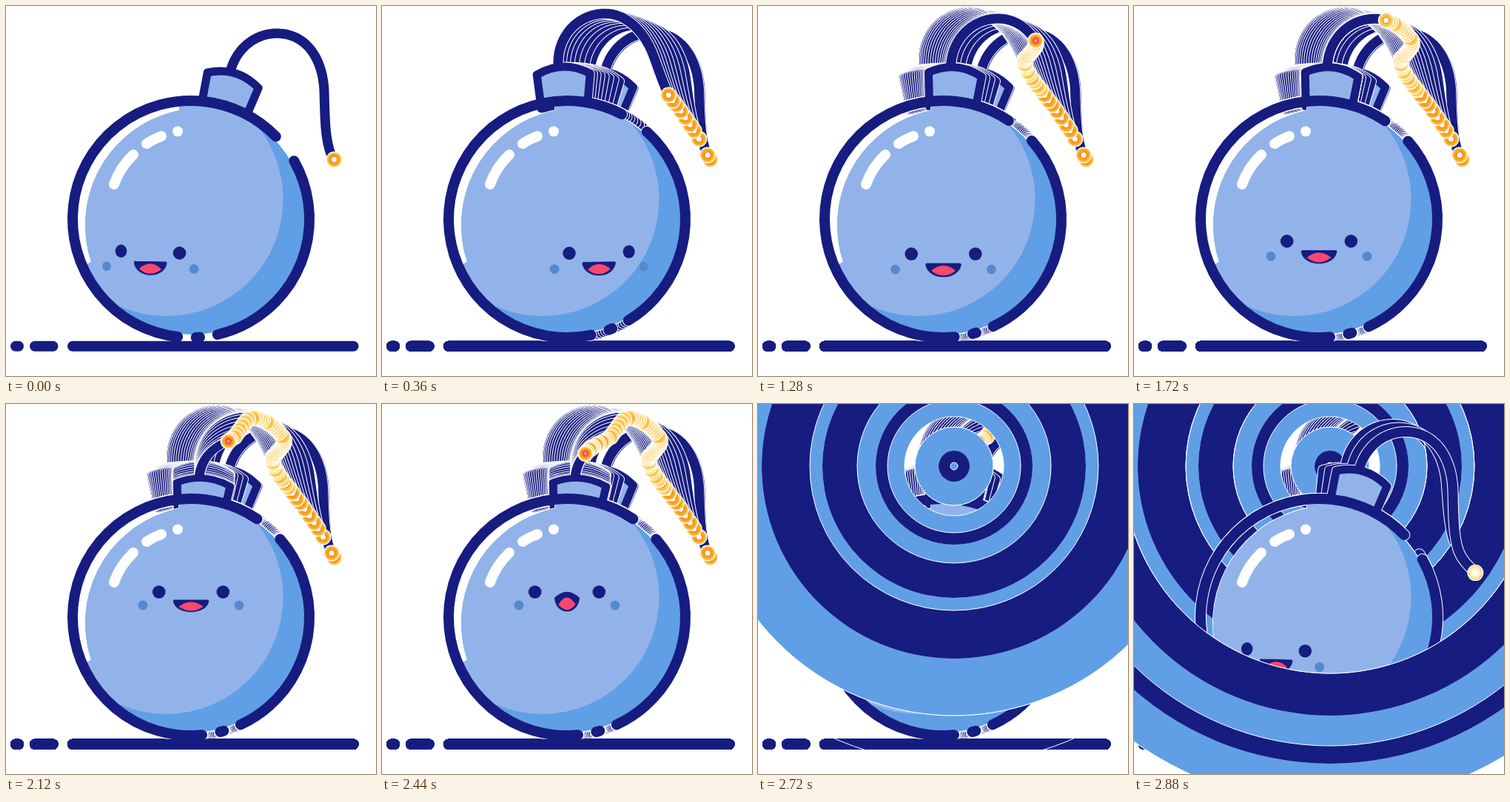
Write an HTML page with a canvas that moves like this. It is 500 px wide and 500 px high and loops after 3.08 s.

```html
<!DOCTYPE html>
<html lang="en">
<head>
<meta charset="utf-8">
<title>Bomb</title>
<style>
html, body { margin: 0; width: 100%; height: 100%; overflow: hidden; background: #fff; }
canvas { display: block; width: 500px; height: 500px; }
</style>
</head>
<body>
<canvas id="stage" width="500" height="500"></canvas>
<script>
const ctx = document.getElementById('stage').getContext('2d');
const NAVY = '#171c80', BLUE = '#609fe6', LIGHT = '#92b3ea', CHEEK = '#5489cf', PINK = '#f7486f';
const LOOP = 3080, STEP = 40, LAST = 72;
const CX = 250, CY = 288, BX = 265, BY = 84;
const TAU = Math.PI * 2;

const rad = a => a * Math.PI / 180;
const lerp = (a, b, u) => a + (b - a) * u;
const clamp = u => Math.max(0, Math.min(1, u));
const span = (t, a, b) => clamp((t - a) / (b - a));
const smooth = u => u * u * (3 - 2 * u);
const easeOut = (u, p) => 1 - Math.pow(1 - u, p);

// Fuse as a polyline with running length
const fuse = [];
let fuseLen = 0;
[
  [302, 94, 308, 60, 335, 37, 366, 37],
  [366, 37, 405, 37, 428, 70, 430, 115],
  [430, 115, 431, 150, 431, 176, 438, 197],
  [438, 197, 443, 210, 452, 218, 461, 227]
].forEach(b => {
  for (let i = 0; i <= 30; i++) {
    const u = i / 30, v = 1 - u;
    const at = o => v * v * v * b[o] + 3 * v * v * u * b[o + 2] + 3 * v * u * u * b[o + 4] + u * u * u * b[o + 6];
    const x = at(0), y = at(1), p = fuse[fuse.length - 1];
    if (p) fuseLen += Math.hypot(x - p.x, y - p.y);
    fuse.push({ x, y, len: fuseLen });
  }
});

function tilt(t) {
  if (t >= 2760) return t < 2820 ? -5 : t < 2860 ? -2.5 : 0.3;
  if (t < 80) return -0.5 * t / 40;
  if (t < 640) return lerp(-6.2, -22.2, easeOut(span(t, 80, 640), 2));
  return lerp(-22.2, -11.8, smooth(span(t, 640, 1340)));
}

function faceShift(t) {
  if (t >= 2760) return -58;
  if (t < 640) return lerp(-55, 52, easeOut(span(t, 40, 640), 3.3));
  return lerp(52, 0, smooth(span(t, 640, 1320)));
}

function pose(t) {
  const back = t >= 2760;
  return {
    t,
    turn: rad(tilt(t)),
    shift: faceShift(t),
    rise: back ? 0 : smooth(span(t, 1560, 2100)),
    press: back ? 0 : smooth(span(t, 1760, 2120)),
    open: back ? 0 : smooth(span(t, 2240, 2440)),
    left: back ? fuseLen : Math.max(4, fuseLen - 26 - 0.103 * t)
  };
}

function disc(x, y, r, col) {
  ctx.fillStyle = col;
  ctx.beginPath();
  ctx.arc(x, y, r, 0, TAU);
  ctx.fill();
}

function oval(x, y, rx, ry, col) {
  ctx.fillStyle = col;
  ctx.beginPath();
  ctx.ellipse(x, y, rx, ry, 0, 0, TAU);
  ctx.fill();
}

function stroke(col, w) {
  ctx.strokeStyle = col;
  ctx.lineWidth = w;
  ctx.stroke();
}

function turnBody(p, press) {
  if (press) {
    ctx.translate(0, 185);
    ctx.scale(1, 1 - 0.172 * p.press);
    ctx.translate(0, -185);
  }
  ctx.translate(CX, CY);
  ctx.rotate(p.turn);
}

function drawFuse(p, col, grow) {
  ctx.save();
  turnBody(p, true);
  ctx.translate(-CX, -CY);
  ctx.beginPath();
  for (const q of fuse) {
    if (q.len > p.left) break;
    ctx.lineTo(q.x, q.y);
  }
  stroke(col, 13 + grow);
  ctx.restore();
}

function drawCap(p, col, grow) {
  ctx.save();
  turnBody(p, true);
  ctx.rotate(rad(16.8));
  ctx.beginPath();
  ctx.moveTo(-31, -150);
  ctx.lineTo(-36, -196);
  ctx.quadraticCurveTo(0, -216, 36, -196);
  ctx.lineTo(31, -150);
  ctx.closePath();
  ctx.fillStyle = LIGHT;
  ctx.fill();
  stroke(col, 11 + grow);
  ctx.restore();
}

function drawOutline(p, col, grow) {
  ctx.save();
  turnBody(p, false);
  for (const [a, b] of [[-29.5, 77.1], [85.7, 87.6], [96.4, 315.8]]) {
    ctx.beginPath();
    ctx.arc(0, 0, 160, rad(a), rad(b));
    stroke(col, 14 + grow);
  }
  ctx.restore();
}

function drawBody() {
  ctx.save();
  ctx.beginPath();
  ctx.arc(CX, CY, 156, rad(-95.9), rad(156.3));
  ctx.arc(265, 296, 158, rad(161.7), rad(258.8));
  ctx.closePath();
  stroke('#fff', 2);
  ctx.fillStyle = BLUE;
  ctx.fill();
  ctx.clip();
  disc(216.5, 261, 158, LIGHT);
  ctx.restore();

  ctx.beginPath();
  ctx.moveTo(146, 241);
  ctx.quadraticCurveTo(154, 218, 172, 201);
  ctx.moveTo(190, 186);
  ctx.quadraticCurveTo(199, 180, 210, 176);
  stroke('#fff', 14);
  disc(232, 169.5, 7, '#fff');
}

function drawFace(p) {
  const s = p.shift, side = Math.abs(s) / 55;
  const x = CX + s, y = 335 - 2.5 * side - 81 * p.rise;
  const low = 21 - 3 * p.rise, wide = 1 - 0.08 * side;
  const lean = s * 0.025;
  for (const k of [-1, 1]) {
    const far = k * s > 0 ? side : 0;
    oval(x + k * lerp(43.3, 39.5, side), y - k * lean, 8.8 - far, 8.8, NAVY);
    oval(x + k * lerp(65, 59, side), y + low - k * lean * 1.4, 6.4 - far * 0.5, 6.4, CHEEK);
  }
  const up = p.open * 10;
  ctx.save();
  ctx.translate(x, y + low + 0.8);
  ctx.rotate(-s * 0.0005);
  ctx.scale(wide * (1 - 0.3 * p.open), 1 - 0.1 * p.rise);
  ctx.beginPath();
  ctx.moveTo(-22, -7 - up * 0.4);
  ctx.quadraticCurveTo(0, -7 - up * 2, 22, -7 - up * 0.4);
  ctx.bezierCurveTo(18, 12, -18, 12, -22, -7 - up * 0.4);
  ctx.fillStyle = NAVY;
  ctx.fill();
  stroke(NAVY, 4.5);
  ctx.beginPath();
  ctx.moveTo(-16.5, 1 - up * 0.3);
  ctx.quadraticCurveTo(0, -13 - up, 16.5, 1 - up * 0.3);
  ctx.quadraticCurveTo(0, 14, -16.5, 1 - up * 0.3);
  ctx.fillStyle = PINK;
  ctx.fill();
  ctx.restore();
}

function drawSpark(p) {
  let tip = fuse[0];
  for (const q of fuse) if (q.len <= p.left) tip = q;
  const dx = tip.x - CX, dy = tip.y - CY;
  const c = Math.cos(p.turn), s = Math.sin(p.turn);
  const x = CX + dx * c - dy * s;
  const y = 185 + (CY + dx * s + dy * c - 185) * (1 - 0.172 * p.press);
  const pale = p.t > 2760;
  const early = p.t < 400;
  const red = p.t > 1200 && p.t < 1320 || p.t > 2080 && !pale;
  disc(x, y, 11, '#fff');
  disc(x, y, 9.8, early ? '#fbc04a' : '#fdd679');
  disc(x, y, 7.8, pale ? '#fdecc0' : early || red ? '#f9a01b' : '#fcc23c');
  disc(x, y, 4.8, pale ? '#fff7e2' : red ? '#f0574a' : '#f68b28');
  disc(x, y, red ? 1.8 : 3.4, red ? '#fbb08a' : '#fff');
}

function drawGround() {
  ctx.beginPath();
  for (const [a, b] of [[13, 17], [39, 63.5], [90, 469.5]]) {
    ctx.moveTo(a, 459.8);
    ctx.lineTo(b, 459.8);
  }
  stroke(NAVY, 14);
}

function drawBomb(t) {
  const p = pose(t);
  drawFuse(p, '#fff', 2);
  drawCap(p, '#fff', 2);
  drawOutline(p, '#fff', 2);
  drawFuse(p, NAVY, 0);
  drawCap(p, NAVY, 0);
  drawBody();
  drawOutline(p, NAVY, 0);
  drawFace(p);
  drawGround();
  drawSpark(p);
}

function band(a, b, col) {
  if (b <= a) return;
  ctx.fillStyle = col;
  ctx.beginPath();
  ctx.arc(BX, BY, b, 0, TAU);
  ctx.arc(BX, BY, a, 0, TAU, true);
  ctx.fill();
}

function rim(r) {
  if (r <= 0) return;
  ctx.beginPath();
  ctx.arc(BX, BY, r, 0, TAU);
  stroke('#fff', 1);
}

// Blast: each radius is taken over by the next wave one step later
const FRONT = [21, 53, 106, 178, 260, 337, 402, 457, 620];
const HOLE = [0, 0, 5, 67, 90, 131, 195, 280, 378];

function drawBlast(i) {
  const mid = FRONT[i - 1] || 0, inner = FRONT[i - 2] || 0, hole = HOLE[i];
  band(Math.max(hole, inner), mid, BLUE);
  band(hole, inner, NAVY);
  rim(hole);
  rim(mid);
  rim(FRONT[i]);
}

function drawStep(k) {
  const t = k * STEP;
  if (k < 62) drawBomb(t);
  else if (k <= 70) drawBlast(k - 62);
  if (k >= 70) {
    const r = [131, 195, 280][k - 70];
    ctx.save();
    ctx.beginPath();
    ctx.arc(BX, BY, r, 0, TAU);
    ctx.clip();
    drawBomb(t);
    ctx.restore();
    rim(r);
  }
}

// Steps pile up on the canvas until the loop restarts
let done = -1;
function show(now) {
  const k = Math.min(LAST, Math.floor((now % LOOP) / STEP));
  if (k < done) done = -1;
  while (done < k) {
    if (done < 0) {
      ctx.fillStyle = '#fff';
      ctx.fillRect(0, 0, 500, 500);
    }
    drawStep(++done);
  }
}

ctx.lineCap = ctx.lineJoin = 'round';
const start = performance.now();
function tick() {
  show(performance.now() - start);
  requestAnimationFrame(tick);
}
tick();
</script>
</body>
</html>
```
